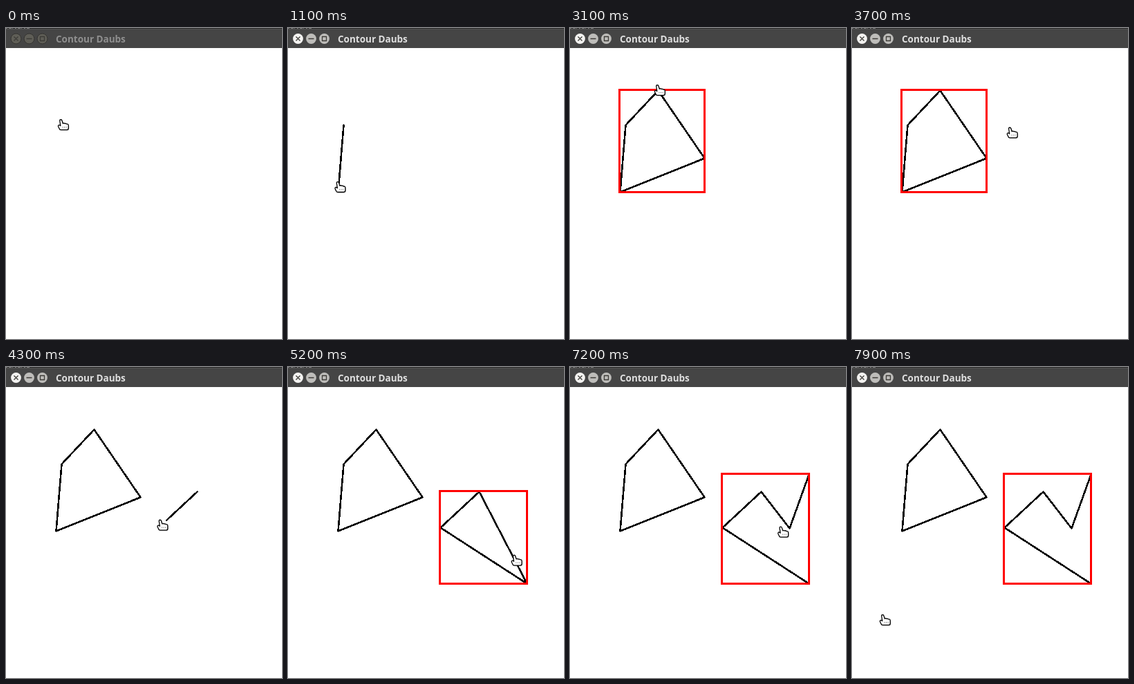
An HTML page that plays this animation: 399x450 px, repeating every 8 s.

```html
<!DOCTYPE html>
<html lang="en">
<head>
<meta charset="utf-8">
<title>Contour Daubs</title>
<style>
  html, body { margin: 0; width: 100%; height: 100%; overflow: hidden; background: #fff; }
  svg { display: block; }
  #drawing { fill: none; stroke: #000; stroke-width: 2.6; stroke-linejoin: round; shape-rendering: crispEdges; }
  #box { stroke: #f00; stroke-width: 3; }
  #title { font: bold 13.5px "Noto Sans", "Open Sans", sans-serif; fill: #dedede; }
  .button { fill: #bebdba; }
  .close { fill: #f4f3f1; }
  .glyph { fill: none; stroke: #3c3b37; stroke-width: 1.3; }
  .inactive #title { fill: #8f8f8f; }
  .inactive .button { fill: #5f5e57; stroke: #353431; }
</style>
</head>
<body>
<svg width="399" height="450" viewBox="0 0 399 450">
  <defs>
    <path id="hand" d="M-2.3-6Q-2.3-7.5-.8-7.5T1-6L2.3-1.8Q3.8-3 5-1.7Q6.5-2.4 7.5-1.1Q10.3-1.3 10.3 1V5Q10.3 7.4 8 7.4H-1Q-2.5 7.4-3 5.5L-4.5 2.5Q-4.8.2-3 .3L-1.2 1.5Z"/>
  </defs>
  <g id="frame">
    <rect width="399" height="29" fill="#454545"/>
    <path d="M0 .5H399" stroke="#242424"/>
    <path d="M0 1.5H399" stroke="#555"/>
    <path d="M0 .5H35" stroke="#777" stroke-dasharray="2 2 4 1 1 3"/>
    <circle class="button close" cx="14.5" cy="15.5" r="7.4"/>
    <circle class="button" cx="33.5" cy="15.5" r="7.4"/>
    <circle class="button" cx="52.5" cy="15.5" r="7.4"/>
    <path class="glyph" d="M11.5 12.5l6 6m0-6l-6 6M29.5 15.5h8M49.5 12.5h6v6h-6z"/>
    <text id="title" x="72" y="21">Contour Daubs</text>
  </g>
  <g id="drawing" transform="translate(.5 .5)">
    <polygon/><polygon/><rect id="box"/>
  </g>
  <g id="cursor">
    <use href="#hand" x="1" y="1" opacity=".25"/>
    <use href="#hand" fill="#fff" stroke="#000" stroke-width="1.3" stroke-linejoin="round"/>
    <path d="M1.5 3.5H8" stroke="#555" stroke-dasharray="1 1.5"/>
  </g>
</svg>
<script>
const LOOP = 8000, STEP = 100, LAG = 80, REACH = 100, TRAVEL = 800;
const $ = id => document.getElementById(id);
const polygons = document.querySelectorAll("polygon");

const mix = (a, b, k) => a.map((v, i) => v + (b[i] - v) * k);
const smooth = k => k * k * (3 - 2 * k);
const easeOut = k => k * (2 - k);

const vertex = (grab, drop, x, y) => ({ grab, drop, at: [x, y] });
const shapes = [
  [vertex(550, 550, 80, 140), vertex(550, 1300, 72, 237),
   vertex(1500, 2000, 194, 188), vertex(2100, 2500, 127, 90)],
  [vertex(4000, 4000, 276, 180), vertex(4000, 4400, 220, 232), vertex(4500, 5000, 345, 313),
   vertex(5200, 5600, 345, 155), vertex(5820, 6300, 317, 233)]
];

const moves = [];
let hand = shapes[0][0].at, clock = 0;

function move(start, end, to, ease) {
  start = Math.max(start, clock);
  moves.push({ start, end, from: hand, to, ease });
  hand = to;
  clock = end;
}

// Each new vertex is pulled out of the closing edge, a quarter of the way along
for (const shape of shapes) {
  shape.forEach(({ grab, drop, at }, i) => {
    const origin = i ? mix(shape[i - 1].at, shape[0].at, 0.25) : at;
    move(grab - (i ? REACH : TRAVEL), grab, origin, smooth);
    move(grab, drop, at, easeOut);
  });
}
move(LOOP - STEP - TRAVEL, LOOP - STEP, [45, 366], smooth);

function pointer(t) {
  const { start, end, from, to, ease } = moves.findLast(m => m.start <= t);
  return mix(from, to, ease(Math.min(1, (t - start) / (end - start)) || 0));
}

const outline = (shape, t) => shape.filter(v => t >= v.grab)
  .map(v => t < v.drop ? pointer(Math.max(v.grab, t - LAG)) : v.at);

function drawBox(points) {
  const box = $("box");
  box.style.display = points.length > 2 ? "" : "none";
  if (points.length < 3) return;
  ["x", "y"].forEach((axis, i) => {
    const values = points.map(p => Math.round(p[i]));
    const low = Math.min(...values) - 1;
    box.setAttribute(axis, low);
    box.setAttribute(["width", "height"][i], Math.max(...values) - low);
  });
}

function draw() {
  const t = Math.floor(performance.now() % LOOP / STEP) * STEP;
  const outlines = shapes.map(shape => outline(shape, t));
  outlines.forEach((points, i) => polygons[i].setAttribute("points", points.join(" ")));
  drawBox(outlines.findLast(points => points.length) || []);
  $("frame").setAttribute("class", t < 500 ? "inactive" : "");
  $("cursor").setAttribute("transform", `translate(${pointer(t)})`);
  requestAnimationFrame(draw);
}
draw();
</script>
</body>
</html>
```
